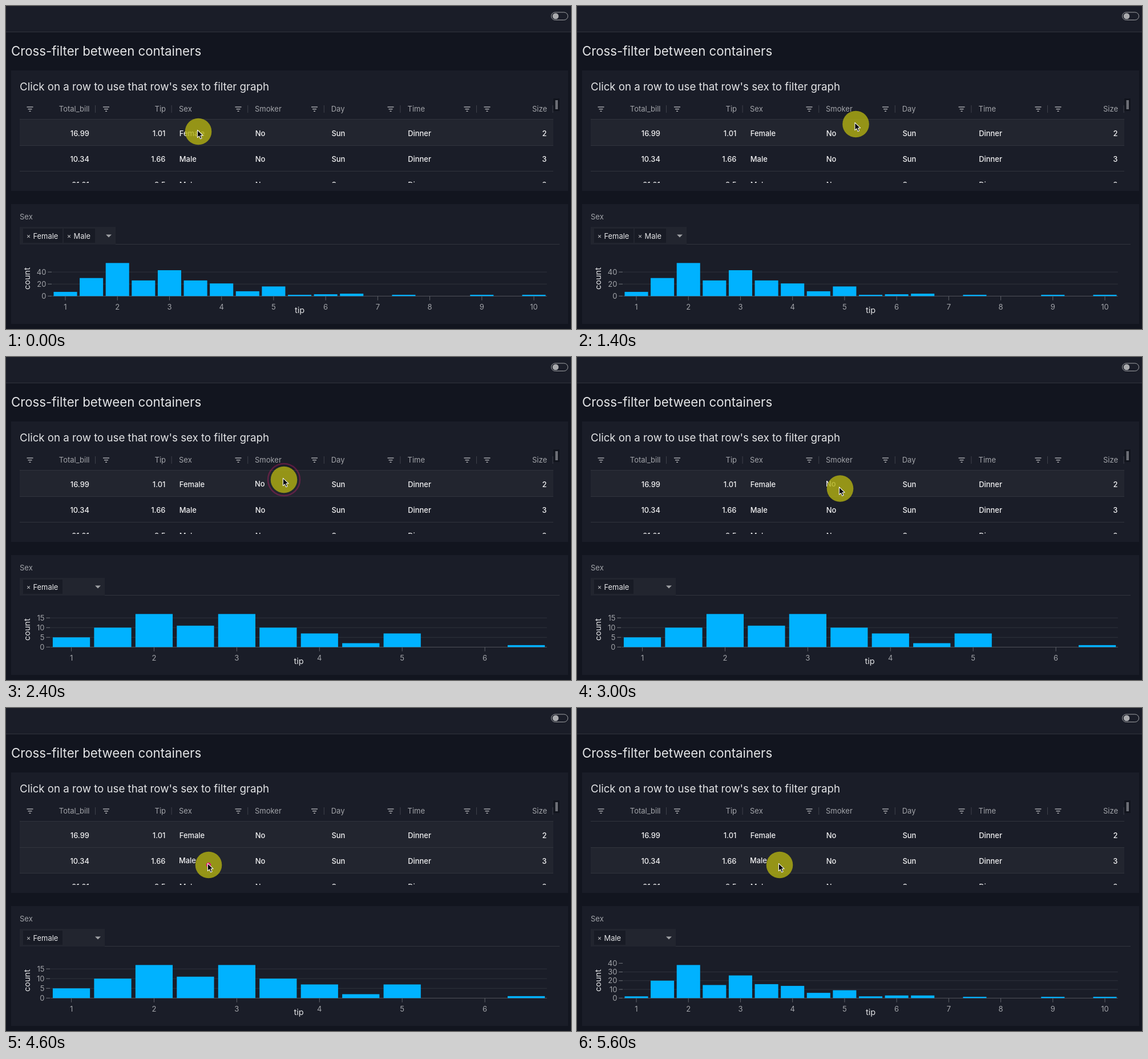
An HTML page with a canvas for the animation above (7.4 s loop, 990x566 px).

```html
<!DOCTYPE html>
<html lang="en">
<head>
<meta charset="utf-8">
<title>Cross-filter between containers</title>
<style>
  html, body { margin: 0; width: 100%; height: 100%; overflow: hidden; background: #12151f; }
  canvas { display: block; width: 990px; height: 566px; }
</style>
</head>
<body>
<canvas id="stage"></canvas>
<script>
const W = 990, H = 566, LOOP = 7400, STEP = 200;
const CLICKS = [1600, 4600];
const canvas = document.getElementById('stage');
const ctx = canvas.getContext('2d');
const ratio = window.devicePixelRatio || 1;
canvas.width = W * ratio;
canvas.height = H * ratio;

const PAGE = '#12151f', PANEL = '#1a1d28', RULE = '#31343d', ROW = '#22252f';
const MUTED = '#a3a5aa', BRIGHT = '#e4e5e7';

const CHARTS = {
  both: {
    tags: ['Female', 'Male'], boxEnd: 192, left: 81.2, first: 1, ticks: [0, 20, 40],
    bins: [7, 30, 55, 26, 43, 26, 21, 8, 16, 2, 3, 4, 0, 1, 0, 0, 1, 0, 1]
  },
  female: {
    tags: ['Female'], boxEnd: 173, left: 78.3, first: 1, ticks: [0, 5, 10, 15],
    bins: [5, 10, 17, 11, 17, 10, 7, 2, 7, 0, 0, 1]
  },
  male: {
    tags: ['Male'], boxEnd: 173, left: 81.2, first: 1, ticks: [0, 10, 20, 30, 40],
    bins: [2, 20, 38, 15, 26, 16, 14, 6, 9, 2, 3, 3, 0, 1, 0, 0, 1, 0, 1]
  }
};

// label, text x, alignment, filter icon x, values
const COLUMNS = [
  ['Total_bill', 146.5, 'right', 42, ['16.99', '10.34', '21.01']],
  ['Tip', 280, 'right', 175.5, ['1.01', '1.66', '3.5']],
  ['Sex', 303, 'left', 407, ['Female', 'Male', 'Male']],
  ['Smoker', 436, 'left', 540.5, ['No', 'No', 'No']],
  ['Day', 569.7, 'left', 674, ['Sun', 'Sun', 'Sun']],
  ['Time', 703.5, 'left', 808, ['Dinner', 'Dinner', 'Dinner']],
  ['Size', 948, 'right', 843, ['2', '3', '3']]
];

// pointer path: time, x, y, easing from the previous point
const linear = p => p;
const smooth = p => p * p * (3 - 2 * p);
const easeIn = p => p ** 1.5;
const easeOut = p => 1 - (1 - p) ** 2;
const PATH = [
  [0, 337, 220, linear],
  [1000, 488.5, 207, smooth],
  [1400, 488.5, 207, linear],
  [1600, 487, 215, linear],
  [2400, 487, 215, linear],
  [3600, 413.5, 259, easeIn],
  [4000, 355, 275, easeOut]
];

function pointerAt(t) {
  const i = PATH.findIndex(k => k[0] > t);
  if (i < 0) return PATH[PATH.length - 1].slice(1, 3);
  const [t0, x0, y0] = PATH[i - 1], [t1, x1, y1, ease] = PATH[i];
  const p = ease((t - t0) / (t1 - t0));
  return [x0 + (x1 - x0) * p, y0 + (y1 - y0) * p];
}

function rect(x, y, w, h, color) {
  ctx.fillStyle = color;
  ctx.fillRect(x, y, w, h);
}

function text(str, x, y, size, color, align = 'left', weight = 400) {
  ctx.font = `${weight} ${size}px Inter, sans-serif`;
  ctx.textAlign = align;
  ctx.fillStyle = color;
  ctx.fillText(str, x, y);
}

function polygon(points, color) {
  ctx.beginPath();
  points.forEach(([x, y]) => ctx.lineTo(x, y));
  ctx.closePath();
  ctx.fillStyle = color;
  ctx.fill();
}

function disc(x, y, r, color) {
  ctx.beginPath();
  ctx.arc(x, y, r, 0, Math.PI * 2);
  ctx.fillStyle = color;
  ctx.fill();
}

function drawPage() {
  rect(0, 0, W, H, PAGE);
  rect(0, 0, W, 45, PANEL);
  rect(0, 45, W, 1, RULE);

  ctx.beginPath();
  ctx.roundRect(955.5, 11, 29, 13.5, 6.75);
  ctx.strokeStyle = '#a0a2a5';
  ctx.lineWidth = 1;
  ctx.stroke();
  disc(963, 17.8, 5.3, '#a9aaad');

  text('Cross-filter between containers', 9, 87, 22.24, BRIGHT);
  rect(9, 113, 976, 211, PANEL);
  rect(9, 347, 976, 210, PANEL);
  text("Click on a row to use that row's sex to filter graph", 24, 148, 18.68, BRIGHT);
}

function drawTable(litRows, active) {
  COLUMNS.forEach(([label, x, align, icon], i) => {
    text(label, x, 185, 13, MUTED, align);
    [11, 7, 3].forEach((w, k) => rect(icon - w / 2, 176.4 + k * 3.65, w, 1.2, '#c9cacd'));
    rect(156 + i * 133.6, 174, 1, 13, '#3f424b');
  });
  rect(959, 162, 11, 22, '#11141d');
  rect(962.5, 165, 4.5, 16, '#6d6f76');

  litRows.forEach(r => rect(24, 199 + r * 45, 935, 45, ROW));
  [198, 244, 289].forEach(y => rect(24, y, 935, 1, RULE));

  ctx.save();
  ctx.beginPath();
  ctx.rect(24, 199, 935, 111);
  ctx.clip();
  COLUMNS.forEach(([label, x, align, , values]) => values.forEach((value, r) => {
    const nudge = active && active[0] === r && active[1] === label ? 0.8 : 0;
    const inset = align === 'left' ? 0.8 : -0.6;
    text(value, x + inset - nudge, 227.8 + r * 45 - nudge, 12.9, '#f2f2f3', align, 500);
  }));
  ctx.restore();
}

function drawFilter({ tags, boxEnd }) {
  text('Sex', 24, 374, 13, MUTED);
  rect(24, 417, 946, 1, RULE);
  rect(24, 387, boxEnd - 24, 31, ROW);
  let x = 30;
  tags.forEach(tag => {
    const w = tag === 'Female' ? 69 : 55;
    rect(x, 390, w, 25, '#181b25');
    text('×', x + 9.5, 407, 11.5, '#c5c6c9', 'center');
    text(tag, x + 17.5, 407.5, 12.9, BRIGHT);
    x += w + 2;
  });
  const a = boxEnd - 12;
  polygon([[a - 5, 400.5], [a + 5, 400.5], [a, 405.5]], '#a0a2a6');
}

function drawChart({ left, first, ticks, bins }, alpha) {
  const right = 947.8, base = 508.3, height = 61;
  const unit = height / (Math.max(...bins) / 0.95);
  const slot = (right - left) / bins.length;
  ctx.save();
  ctx.globalAlpha = alpha;
  ticks.forEach(v => {
    const y = base - v * unit;
    if (v && v * unit < height - 0.5) rect(left, y - 0.5, right - left, 1, '#2f323c');
    rect(left - 8, y - 0.5, 7, 1, '#70737a');
    text(v, left - 10.8, y + 4.6, 13, MUTED, 'right');
  });
  rect(left, base - 0.4, right - left, 1, '#50535b');
  bins.forEach((n, i) => {
    const mid = left + slot * (i + 0.5);
    const h = n && Math.max(n * unit, 2.2);
    rect(mid - slot * 0.45, base - h, slot * 0.9, h, '#00b2ff');
    if (i % 2 === 0) {
      rect(mid - 0.5, base, 1, 7.5, '#60636a');
      text(first + i / 2, mid, 532.3, 13, MUTED, 'center');
    }
  });
  text('tip', (left + right) / 2, 538, 14.5, BRIGHT, 'center');
  ctx.translate(41.5, 477.5);
  ctx.rotate(-Math.PI / 2);
  text('count', 0, 0, 14.5, BRIGHT, 'center');
  ctx.restore();
}

function drawLoader(time) {
  for (let i = 0; i < 5; i++) {
    const phase = Math.max(0, time - i * 100) / 240;
    const grow = phase < 2 ? smooth(phase < 1 ? phase : 2 - phase) : 0;
    const h = 37 * (0.4 + 0.6 * grow);
    rect(474.3 + i * 9.5, 487.5 - h / 2, 5.8, h, '#929497');
  }
}

function drawPointer(x, y, age) {
  disc(x, y, 23.3, 'rgba(178,177,18,0.8)');
  if (age >= 0 && age <= 800) {
    const p = age / 800;
    ctx.beginPath();
    ctx.arc(x, y, 3 + 25 * (1 - (1 - p) ** 1.3), 0, Math.PI * 2);
    ctx.strokeStyle = `rgba(220,30,115,${1 - 0.67 * p})`;
    ctx.lineWidth = 2.5;
    ctx.stroke();
  }
  ctx.save();
  ctx.translate(x - 1.6, y - 2.6);
  const arrow = [[0, 0], [0, 13.2], [3, 10.4], [5.2, 15.4], [7.6, 14.3], [5.5, 9.5], [9.6, 9.3]];
  polygon(arrow, '#000');
  ctx.strokeStyle = '#f4f4f4';
  ctx.lineWidth = 1.1;
  ctx.lineJoin = 'round';
  ctx.stroke();
  ctx.restore();
}

function draw(t) {
  const [x, y] = pointerAt(t);
  const choose = delay => t >= CLICKS[1] + delay ? CHARTS.male
    : t >= CLICKS[0] + delay ? CHARTS.female : CHARTS.both;
  const age = t - (t >= CLICKS[1] ? CLICKS[1] : CLICKS[0]);
  const loading = age >= 200 && age < 800;
  const lit = [];
  if (t < CLICKS[1] + 200) lit.push(0);
  if (y > 247) lit.push(1);
  const active = t >= CLICKS[1] ? [1, 'Sex'] : t >= CLICKS[0] ? [0, 'Smoker'] : null;

  ctx.setTransform(ratio, 0, 0, ratio, 0, 0);
  drawPage();
  drawTable(lit, active);
  drawFilter(choose(200));
  drawChart(choose(400), loading ? 0.32 : 1);
  if (loading) drawLoader(age - 190);
  drawPointer(x, y, age);
}

const start = performance.now();
function tick() {
  const t = (performance.now() - start) % LOOP;
  draw(Math.floor(t / STEP) * STEP);
  requestAnimationFrame(tick);
}
tick();
</script>
</body>
</html>
```
